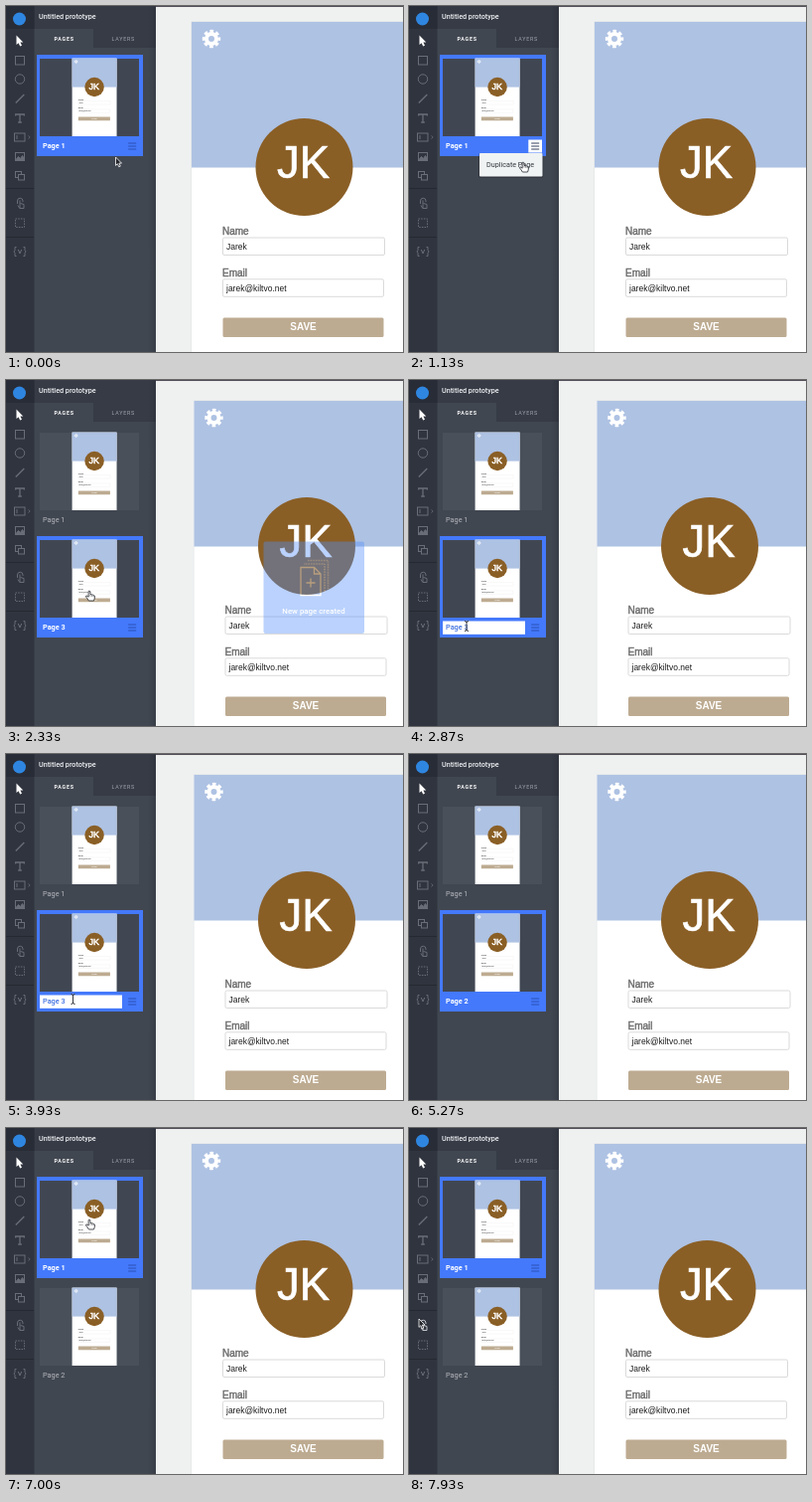
Write an HTML page that moves like this. It is 400 by 348 pixels and loops after 8000 ms.

```html
<!DOCTYPE html>
<html lang="en">
<head>
<meta charset="utf-8">
<title>Duplicate a page</title>
<style>
  html, body { margin: 0; width: 100%; height: 100%; overflow: hidden; }
  svg { display: block; width: 100vw; height: 100vh; }
  text { font-family: Roboto, sans-serif; white-space: pre; }
  .form text { font-family: "Liberation Sans", Arial, sans-serif; }
  .initials { stroke: #fff; stroke-width: var(--ink, .7); }
  .tab { font-size: 5.3px; letter-spacing: .8px; }
  .label { font-size: 7.3px; }
  .tools { fill: none; stroke: #686d77; }
</style>
</head>
<body>
<svg viewBox="0 0 400 348">
  <defs>
    <linearGradient id="edge">
      <stop offset="0" stop-color="#20242b" stop-opacity="0"/>
      <stop offset="1" stop-color="#20242b" stop-opacity=".25"/>
    </linearGradient>
    <g id="page" class="form">
      <rect width="227" height="396" fill="#fff"/>
      <rect width="227" height="146.5" fill="#aec2e3"/>
      <g transform="translate(20 17)" fill="none" stroke="#fff">
        <circle r="5" stroke-width="4"/>
        <circle r="7.4" stroke-width="3.6" stroke-dasharray="3.4 2.41" stroke-dashoffset="1.7"/>
      </g>
      <circle cx="113.5" cy="146" r="49" fill="#8a5f26"/>
      <text class="initials" x="112.5" y="157.2" font-size="45.5" fill="#fff" text-anchor="middle">JK</text>
      <g font-size="10" fill="#6e6e6e" stroke="#6e6e6e" stroke-width=".45">
        <text x="31" y="213.5">Name</text>
        <text x="31" y="255.5">Email</text>
      </g>
      <g fill="#fff" stroke="#dadada">
        <rect x="31.5" y="217" width="163" height="17.5" rx="1.5"/>
        <rect x="31.5" y="258.8" width="162" height="17.5" rx="1.5"/>
      </g>
      <g font-size="8.5" fill="#1c1c1c">
        <text x="35" y="228.6">Jarek</text>
        <text x="35" y="270.6">jarek@kiltvo.net</text>
      </g>
      <rect x="31.5" y="297.5" width="162" height="19.5" rx="1.5" fill="#bdab91"/>
      <text x="112.5" y="309.8" font-size="10" font-weight="bold" fill="#fff" text-anchor="middle">SAVE</text>
    </g>
    <g id="arrow" fill="#22252b" stroke="#fff" stroke-width=".8" stroke-linejoin="round">
      <path d="M0 0V8.4L1.9 6.7L3.3 9.8L4.8 9.1L3.4 6.1H6Z"/>
    </g>
    <g id="hand" fill="#fff" stroke="#22252b" stroke-width=".8" stroke-linejoin="round">
      <path d="M-.9 .6Q0-.6.8.6L1 3.6Q2.2 3 2.7 4Q4 3.5 4.3 4.6Q5.6 4.6 5.5 5.8Q5.4 8 4.5 10H-.6Q-1.6 8-3.6 5.8Q-3.4 4.4-2 5.2L-.8 6.2Z"/>
      <path d="M1 4V5.6M2.7 4.4V5.8M4.2 5V6.2" stroke-width=".5"/>
    </g>
    <path id="bar" d="M-2-5Q0-5 0-3.6Q0-5 2-5M0-4V4M-2 5Q0 5 0 3.6Q0 5 2 5"/>
    <g id="beam" fill="none">
      <use href="#bar" stroke="#fff" stroke-opacity=".25" stroke-width="1.9"/>
      <use href="#bar" stroke="#1d2027" stroke-width=".9"/>
    </g>
  </defs>

  <rect width="400" height="348" fill="#eff1f1"/>
  <rect width="400" height="1" fill="#55505a"/>
  <g id="canvas">
    <rect x="-.6" y="-.6" width="229" height="400" fill="#e2e4e5"/>
    <use href="#page"/>
  </g>

  <g id="toast">
    <rect x="259.5" y="162.5" width="101.5" height="92.5" rx="2" fill="#528ffb"/>
    <g fill="none" stroke="#fff">
      <path d="M304 181.5H324.5V210M300.5 185H321V213.5" stroke-width="1.6" stroke-dasharray=".8 .8" opacity=".75"/>
      <path d="M297 188.5H310.5L317 195V216.5H297ZM310.5 188.5V195H317M307 199.5V208.5M302.5 204H311.5" stroke-width="1.3" fill="#528ffb"/>
    </g>
    <text x="310" y="235.3" font-size="7.85" font-weight="500" fill="#fff" text-anchor="middle">New page created</text>
  </g>

  <rect width="151" height="348" fill="#414751"/>
  <rect x="28" width="123" height="42" fill="#363b46"/>
  <rect x="28" y="23" width="60" height="20" fill="#414751"/>
  <rect x="143" width="8" height="348" fill="url(#edge)"/>
  <text x="33" y="13" font-size="7.2" font-weight="500" fill="#f1f2f4">Untitled prototype</text>
  <text class="tab" x="48.5" y="34.8" font-weight="700" fill="#fff">PAGES</text>
  <text class="tab" x="106.5" y="34.8" fill="#a3a7ae">LAYERS</text>

  <rect width="28.5" height="348" fill="#30343e"/>
  <rect width="28.5" height="23" fill="#282c36"/>
  <path d="M0 183.5H28M0 232.5H28" stroke="#252932"/>
  <circle cx="13.5" cy="13" r="6.5" fill="#2f86e0"/>
  <path d="M10.5 29.5V39L12.6 37.2L14.2 40.6L16 39.8L14.4 36.6H17.3Z" fill="#fff"/>
  <g class="tools">
    <rect x="9.5" y="50.5" width="9" height="8.5"/>
    <circle cx="14" cy="73.5" r="4.7"/>
    <path d="M9.8 97.5L18.3 89" stroke-width="1.4"/>
    <path d="M9.7 110.5V109H18.3V110.5M14 109V117M12.2 117H15.8" stroke-width="1.3"/>
    <rect x="8.5" y="128" width="10.5" height="8"/>
    <path d="M11 130V134"/>
    <path d="M22.5 130.5L24.2 132L22.5 133.5" stroke-width=".8"/>
    <rect x="9.5" y="147.5" width="9" height="8"/>
    <path d="M10 154.5L12.5 151.5L14.5 153.5L16.5 150.5L18 153V155H10Z" fill="#686d77"/>
    <rect x="9.5" y="166.5" width="6" height="6"/>
    <rect x="12.5" y="169.5" width="6" height="5.5" fill="#30343e"/>
    <g id="tapTool">
      <path d="M11.5 199V196A2.7 2.7 0 0 1 17 196V197"/>
      <path d="M14 195.5V203M12 200.5L13.8 203.5H18V199.5L14.5 198.5"/>
    </g>
    <rect x="9.5" y="214" width="9" height="8.5" stroke-dasharray="1.5 1.2"/>
    <path d="M10.5 242.5H9V245.5L8 247L9 248.5V251.5H10.5M17.5 242.5H19V245.5L20 247L19 248.5V251.5H17.5M12.3 245L14 249L15.7 245"/>
  </g>

  <g id="cards"></g>

  <g id="menu">
    <rect x="70" y="148" width="65.5" height="25" rx="2" fill="#000" opacity=".22"/>
    <rect x="71" y="148" width="63.5" height="23.5" rx="1" fill="#f0f3f3"/>
    <text x="78" y="162.3" font-size="7.2" fill="#33373d">Duplicate Page</text>
  </g>
  <use id="cursor"/>
</svg>

<script>
const LOOP = 8000, TICK = 200 / 3;
const $ = id => document.getElementById(id);
const set = (el, attrs) => { for (const k in attrs) el.setAttribute(k, attrs[k]); };
const show = (el, on) => set(el, { opacity: on ? 1 : 0 });
const clamp = v => Math.max(0, Math.min(1, v));

// Pointer path: time, x, y
const PATH = [
  [0, 110.5, 152], [200, 127, 139], [733, 127, 139], [1133, 115, 157],
  [1933, 115, 157], [2000, 113, 155.5], [2333, 84, 212], [2667, 58, 247.5],
  [3000, 58, 247.5], [3467, 67.5, 246.5], [6200, 67.5, 246.5],
  [6667, 59, 133], [6933, 84, 92], [7267, 84, 92], [7933, 10, 192]
];

function pointerAt(t) {
  let i = 0;
  while (i < PATH.length - 2 && t >= PATH[i + 1][0]) i++;
  const [t0, x0, y0] = PATH[i], [t1, x1, y1] = PATH[i + 1];
  const u = clamp((t - t0) / (t1 - t0));
  return { x: x0 + (x1 - x0) * u, y: y0 + (y1 - y0) * u };
}

function makeCard(top) {
  const g = document.createElementNS("http://www.w3.org/2000/svg", "g");
  set(g, { transform: `translate(0 ${top})` });
  g.innerHTML = `
    <rect class="frame" x="31" y="-4" width="107" height="102"/>
    <rect class="back" x="34" width="100" height="78"/>
    <use href="#page" transform="translate(66.6 -.4) scale(.198)" style="--ink: 2.4"/>
    <rect class="field" x="34" y="81.5" width="83" height="13.3"/>
    <rect class="button" x="120.3" y="81.5" width="13.7" height="13" fill="#fff"/>
    <path class="bars" d="M123.2 85H131.2M123.2 88H131.2M123.2 91H131.2"/>
    <text class="label" x="37" y="90"></text>
    <path class="caret" d="M0 83.5V92.5" stroke="#333" stroke-width=".7"/>`;
  $("cards").append(g);
  const card = { g, top };
  for (const n of ["frame", "back", "field", "button", "bars", "label", "caret"])
    card[n] = g.querySelector("." + n);
  return card;
}

function drawCard(c, s) {
  set(c.frame, { fill: s.selected ? "#4479fb" : "#383d46" });
  show(c.frame, s.selected || s.hover);
  set(c.back, { fill: s.selected ? "#414752" : "#4a505a" });
  set(c.field, { fill: s.editing ? "#fff" : "#14171c", opacity: s.editing ? 1 : s.hoverLabel ? .45 : 0 });
  show(c.button, s.menu);
  set(c.bars, { stroke: s.menu ? "#33415f" : s.selected ? "#2a50b5" : "#2b3038" });
  show(c.bars, s.selected || s.hover);
  set(c.label, {
    fill: s.editing ? "#3f70e0" : s.selected ? "#fff" : s.hoverLabel ? "#d3d6da" : "#b5b8bd",
    "font-weight": s.selected ? (s.editing ? 500 : 700) : 400
  });
  c.label.textContent = s.name;
  set(c.caret, { transform: `translate(${s.caret || 0} 0)` });
  show(c.caret, s.caret);
}

const cards = [makeCard(53), makeCard(161)];

function draw(time) {
  const t = Math.floor(time / TICK + .1) * TICK + 5;
  const within = (a, b) => t >= a && t < b;
  const { x, y } = pointerAt(t - 5);

  const copied = t >= 1530;
  const second = within(1530, 7000);
  const menuOpen = within(470, 1530);
  const editing = within(2870, 5270);
  const typed = t < 4400 ? "Page 3" : t < 4800 ? "Page " : "Page 2";

  const over = (c, a, b) => x > 31 && x < 138 && y >= c.top + a && y < c.top + b;
  const onLabel = c => over(c, 78, 95) && x < 118;
  const hidden = within(4400, 6260);

  set($("canvas"), { transform: second ? "translate(189.5 21)" : "translate(187 16)" });
  drawCard(cards[0], {
    name: "Page 1", selected: !second, menu: menuOpen,
    hover: over(cards[0], -3, 97), hoverLabel: onLabel(cards[0])
  });
  show(cards[1].g, copied);
  drawCard(cards[1], {
    name: typed, selected: second, editing,
    hover: over(cards[1], -3, 97), hoverLabel: !hidden && onLabel(cards[1]),
    caret: within(4400, 5270) && (t < 4800 ? 55.5 : 60)
  });

  set($("menu"), { opacity: menuOpen ? clamp((t - 270) / 330) : 0 });
  set($("toast"), { opacity: copied ? (t < 1600 ? .5 : .95 * clamp(1 - (t - 2005) / 570)) : 0 });
  set($("tapTool"), { stroke: t > 7860 ? "#c3c6cb" : "#686d77" });

  const live = copied ? cards : cards.slice(0, 1);
  const onItem = menuOpen && y > 148;
  const onButton = x > 120 && x < 134 && y > 134 && y < 147;
  const kind = onItem || onButton || live.some(c => over(c, 0, 78)) ? "hand"
    : live.some(onLabel) ? "beam" : "arrow";
  set($("cursor"), {
    href: "#" + kind,
    transform: `translate(${x.toFixed(2)} ${y.toFixed(2)})`
  });
  show($("cursor"), !hidden);
}

const start = performance.now();
function loop() {
  draw((performance.now() - start) % LOOP);
  requestAnimationFrame(loop);
}
draw(0);
requestAnimationFrame(loop);
</script>
</body>
</html>
```
